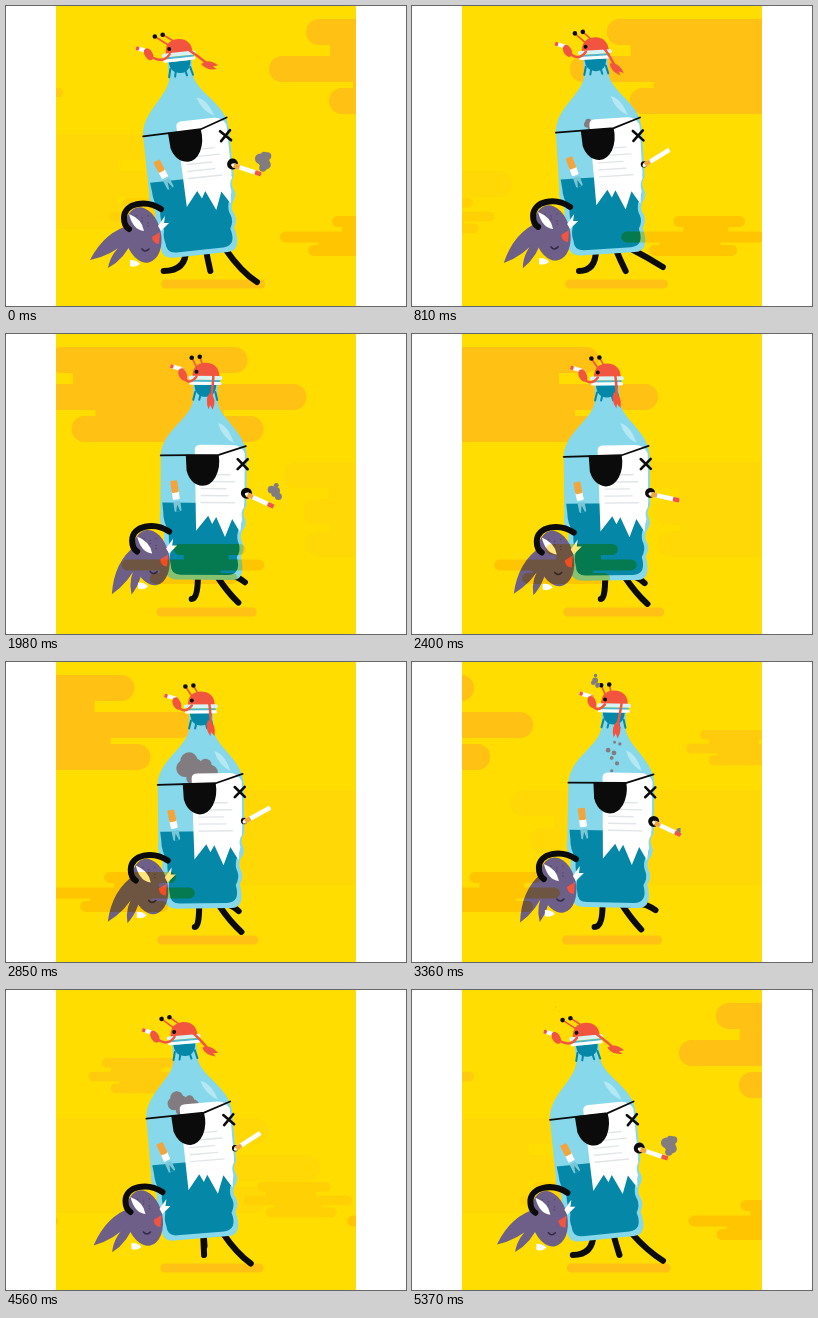
Recreate the animation shown at these times as an HTML page with a canvas. Size 400x300 px, loop 5400 ms.

```html
<!DOCTYPE html>
<html lang="en">
<head>
<meta charset="utf-8">
<title>Walking bottle</title>
<style>
html, body { margin: 0; width: 100%; height: 100%; overflow: hidden; background: #fff; }
canvas { display: block; width: 400px; height: 300px; }
</style>
</head>
<body>
<canvas id="stage"></canvas>
<script>
const LOOP = 5400, STEP = 450, LEGS = 3, PUFF = 1800, TICK = 30;
const YELLOW = '#ffdd00', ORANGE = '#ffc214', GLASS = '#86d8ea', WATER = '#0588a8', INK = '#0b0b0b',
  RED = '#f2553f', PURPLE = '#6e5f88', SMOKE = '#827c80', FILTER = '#f3a53c';
const canvas = document.getElementById('stage');
const c = canvas.getContext('2d');
const dpr = window.devicePixelRatio || 1;
canvas.width = 400 * dpr;
canvas.height = 300 * dpr;

const mix = (a, b, k) => a + (b - a) * k;
const span = (t, a, b) => Math.min(1, Math.max(0, (t - a) / (b - a)));
const smooth = k => k * k * (3 - 2 * k);

function shape(color, path, width) {
  const p = new Path2D(path);
  if (width) { c.strokeStyle = color; c.lineWidth = width; c.stroke(p); }
  else { c.fillStyle = color; c.fill(p); }
}

function oval(color, x, y, rx, ry = rx, turn = 0) {
  c.fillStyle = color;
  c.beginPath();
  c.ellipse(x, y, rx, ry, turn * Math.PI / 180, 0, 7);
  c.fill();
}

function pill(color, x, y, w, h, r = h / 2) {
  c.fillStyle = color;
  c.beginPath();
  c.roundRect(x, y, w, h, r);
  c.fill();
}

function place(x, y, deg, fn) {
  c.save();
  c.translate(x, y);
  c.rotate(deg * Math.PI / 180);
  fn();
  c.restore();
}

// Three rounded bars [left, right], joined by narrower bridges.
const BROAD = [[37, 236], [0, 295], [60, 252]];
const PALE = [[0, 320], [20, 372], [22, 318]];
const LOW = [[124, 295], [0, 340], [67, 276]];

function cloud(bars, x, y, size, color, blend = 'source-over') {
  const tops = [0, 37, 69], h = 26;
  place(x, y, 0, () => {
    c.scale(size, size);
    c.globalCompositeOperation = blend;
    c.fillStyle = color;
    c.beginPath();
    bars.forEach(([l, r], i) => {
      c.roundRect(l, tops[i], r - l, h, h / 2);
      if (!i) return;
      const from = Math.max(l, bars[i - 1][0]) + 24, to = Math.min(r, bars[i - 1][1]) - 40;
      c.rect(from, tops[i - 1] + h - 1, to - from, tops[i] - tops[i - 1] - h + 2);
    });
    c.fill();
  });
}

// Moves left at a steady speed, entering again on the next loop.
function drift(t, speed, x, ...look) {
  for (const lap of [-LOOP, 0, LOOP]) cloud(look[0], x - speed * (t + lap), ...look.slice(1));
}

function puffs(x, y, n, rx, ry, r) {
  if (r <= 0) return;
  for (let i = 0; i < n; i++) {
    const a = i * 2.4, d = Math.sqrt(i / n);
    oval(SMOKE, x + rx * d * Math.cos(a), y + ry * d * Math.sin(a), r * (.8 + .2 * Math.cos(i * 1.7)));
  }
}

function cigarette(len, w, lit) {
  pill('#fff', 0, -w / 2, len, w, 1);
  pill(FILTER, 0, -w / 2, len * .24, w, 1);
  if (lit) pill(RED, len * .78, -w / 2, len * .22, w, 1);
}

// u runs once through ground contact (two thirds) and forward swing.
function leg(u) {
  let x = 251 - 140 * u, y = 265 + 11 * Math.max(0, 1 - u * 5);
  if (u > 2 / 3) {
    const k = u * 3 - 2;
    x = mix(158, 251, 1 - (1 - k) ** 4);
    y = mix(263, 276, k) - 21 * Math.sin(Math.PI * k);
  }
  const hip = 200 + (x - 205) * .42;
  const bend = x > hip ? `${(hip + x) / 2} ${y - 10}` : `${hip} ${y}`;
  shape(INK, `M${hip} 243 Q${bend} ${x} ${y}`, 6);
}

function crab(s, p) {
  shape(WATER, 'M187 52 H209 Q208 64 198 64 Q188 64 187 52');
  for (const side of [-1, 1])
    for (const d of [4, 10]) shape(WATER, `M${198 + side * d} 59 l${side * 2} 8`, 2);
  const eye = 176 + 9 * s;
  shape(RED, 'M185 44 Q185 30 199 30 Q212 31 212 45 Z');
  shape(RED, `M190 36 L${eye} 25 M195 32 L${eye + 8} 24`, 1.6);
  oval(INK, eye, 25, 2.3);
  oval(INK, eye + 8, 24, 2.3);
  oval(INK, 189, 39, 2);
  // rim
  pill('#d8f3f6', 181, 43, 34, 4, 2);
  pill('#4fb7cf', 183, 47, 30, 2, 1);
  pill('#fff', 182, 49, 32, 3, 1);
  const x = 227 - 26 * s, y = 59 + 10 * s;
  shape(RED, `M206 40 Q${mix(216, 205, s)} 48 ${x} ${y}`, 2.5);
  place(x, y, 14 + 76 * s, () => shape(RED, 'M-8 0 Q-2 -7 9 -1 L4 1 L8 3 Q-2 6 -8 0'));
  const lx = 168 + 8 * s;
  shape(RED, `M189 44 Q181 54 ${lx} 43`, 2.5);
  place(lx + 2, 40 - 3 * s, 202 - 8 * s, () => cigarette(15, 4, true));
  oval(RED, lx, 42, 4, 6.5, -25);
  if (p > 1470) {
    const k = span(p, 1470, 1800);
    puffs(mix(182, 170, k), mix(24, 10, k), 4, 5, 7, 4 * (1 - k));
  }
}

function innerSmoke(p) {
  const grow = span(p, 680, 1050), fade = span(p, 1050, 1300);
  const size = grow * (1 - fade);
  puffs(188 + 4 * grow, 122 - 14 * grow - 18 * fade, 9, 16 * size, 11 * size, 9 * size);
  const rise = span(p, 1150, 1740);
  if (rise > 0 && rise < 1) puffs(199, mix(125, 78, rise), 7, 8, 20, 4.5 - 3 * rise);
}

const BODY = 'M186 48 H210 V66 C211 86 240 98 240 124 V172 Q236 179 238 184 Q242 191 236 198' +
  ' Q233 204 237 211 Q239 217 235 223 Q241 247 226 247 H172 Q159 247 160 234' +
  ' Q157 226 160 219 Q157 209 158 199 Q152 190 154 180 V124 C154 98 185 86 186 66 Z';
const LIQUID = 'M156 170 H238 V174 Q233 180 235 186 Q237 192 232 198' +
  ' Q230 205 233 211 Q235 217 231 224 Q236 241 222 242 H175 Q165 242 165 232' +
  ' Q163 225 165 219 Q162 209 163 199 Q157 190 157 179 Z';
const LABEL = 'M188 117 Q188 112 194 112 H226 Q234 112 238 120 V174 Q234 179 236 186' +
  ' L234 199 L226 186 L219 204 L210 184 L206 191 L202 183 L190 198 Z';

function face(p) {
  shape(INK, 'M154 123 L212 122 L239 113', 1.8);
  shape(INK, 'M179 122 H212 Q214 134 209 144 Q204 153 196 153 Q184 152 180 138 Z');
  shape(INK, 'M231 126 L241 136 M241 126 L231 136', 2.6);
  const raised = smooth(span(p, 550, 720)) - smooth(span(p, 1300, 1480));
  oval(INK, 240, 160, mix(5.5, 3.2, raised));
  place(240, 161, mix(24, -28, raised), () => {
    cigarette(30, 4.5, raised < .5);
    oval('#fff', 0, 0, 1.5);
  });
}

function cigSmoke(p) {
  const age = (p + PUFF - 1490) % PUFF;
  if (age > 700) return;
  const grow = span(age, 0, 270), part = span(age, 310, 490), fade = span(age, 490, 700);
  puffs(mix(270, 258, grow) + 12 * part, mix(173, 154, grow) + 3 * part - 20 * fade,
    part < .5 ? 7 : 5, 5 * grow, 9 * grow, mix(5.5, 4, part) * grow * (1 - fade));
}

function bottle(lean, s, p) {
  place(194 + 4 * s, 250 - 3.5 * s, lean, () => {
    c.translate(-198, -248);
    shape(GLASS, BODY);
    shape('#b5e8f2', 'M211 90 Q221 92 227 110 Q215 104 211 90');
    shape(WATER, LIQUID);
    innerSmoke(p);
    shape('#fff', LABEL);
    for (let i = 0; i < 5; i++) pill('#e1e5e7', 194, 141 + 7 * i, 30 + 5 * Math.sin(i * 2), 1.4);
    place(169, 160, -10 + lean * 2, () => {
      pill('#fff', -3.5, -2, 7, 9, 1);
      pill(FILTER, -3.5, -12, 7, 12, 1);
      pill('#7ac6d5', -3.5, 9, 7, 10, 1);
      shape(WATER, 'M-2 19 L0 12 L2 19 Z');
    });
    face(p);
    crab(s, p);
  });
}

function fish(s) {
  place(136 + 9 * s, 229 - 6 * s, 0, () => {
    place(-17, -2, -26 * s, () =>
      shape(PURPLE, 'M6 -8 Q-20 -2 -35 27 Q-14 23 2 8 Q-14 18 -17 35 Q0 26 8 6 Z'));
    oval(PURPLE, 1, 0, 18, 28, -12);
    for (let i = 0; i < 9; i++)
      oval('#55466f', -6 + (i % 3) * 6, -19 + Math.floor(i / 3) * 5 + (i % 2) * 2, .8);
    shape('#fff', 'M-13 -21 Q0 -16 2 -4 Q-9 -5 -13 -21');
    shape('#332a47', 'M0 14 q3 4 7 0', 1.6);
    shape(RED, 'M10 2 L18 -3 L17 9 Q11 9 10 2');
    shape('#fff', 'M16 -9 L23 -19 L22 -12 L27 -12 L19 -4 Z M-12 25 Q-5 25 -2 29 Q-7 33 -12 31 Z');
    shape(INK, 'M19 -26 C4 -36 -18 -32 -18 -17 Q-18 -9 -13 -6', 6);
  });
}

function render(time) {
  const t = Math.floor(time / TICK) * TICK % LOOP;
  const p = t % PUFF;
  const s = (1 - Math.cos(2 * Math.PI * t / STEP)) / 2;
  const lean = mix(-6, 1.2, s);
  c.setTransform(dpr, 0, 0, dpr, 0, 0);
  c.lineCap = c.lineJoin = 'round';
  c.fillStyle = '#fff';
  c.fillRect(0, 0, 400, 300);
  c.save();
  c.beginPath();
  c.rect(50, 0, 300, 300);
  c.clip();
  c.fillStyle = YELLOW;
  c.fillRect(50, 0, 300, 300);

  drift(t, .13, 535, PALE, 128, 1, '#ffd806');
  drift(t, .13, 263, BROAD, 13, 1, ORANGE);
  drift(t, .16, 812, BROAD, 68, .37, '#ffcb0c');
  drift(t, .16, 967, BROAD, 192, .37, '#ffd004');
  pill(ORANGE, 155 - 5 * s, 273.5, 104 - 4 * s, 9);

  for (let i = 0; i < LEGS; i++) leg((t / STEP + i) % LEGS / LEGS);
  bottle(lean, s, p);
  fish(s);
  cigSmoke(p);
  drift(t, .08, 274, LOW, 210, .42, '#ffe57a', 'multiply');
  c.restore();
}

const start = performance.now();
function loop() {
  render(performance.now() - start);
  requestAnimationFrame(loop);
}
loop();
</script>
</body>
</html>
```
